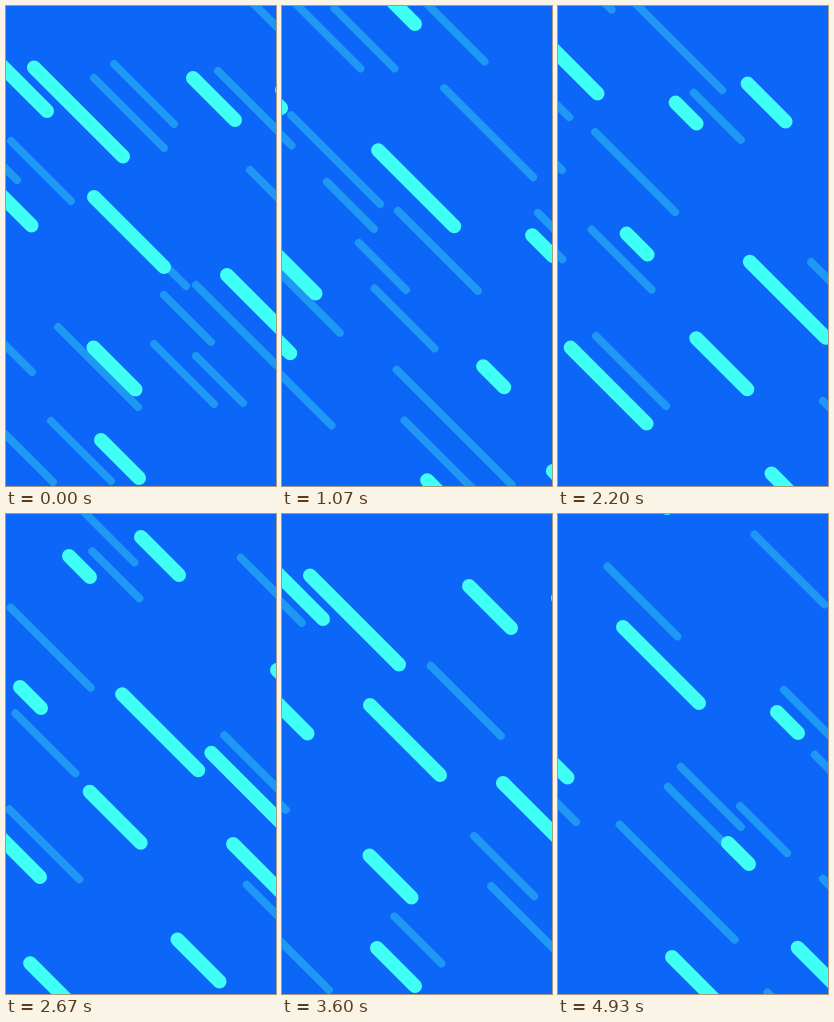
Recreate the animation shown at these times as an HTML page. Size 270 px wide and 480 px high, loop 4.99 s.

```html
<!DOCTYPE html>
<html lang="en">
<head>
<meta charset="utf-8">
<title>Diagonal streaks</title>
<style>
  html, body { margin: 0; width: 100%; height: 100%; overflow: hidden; background: #0c66f7; }
  svg { display: block; width: 100%; height: 100%; }
  line { stroke-linecap: round; }
  .thin { stroke: #1f97f5; stroke-width: 8; }
  .bold { stroke: #40fff5; stroke-width: 14; }
</style>
</head>
<body>
<svg viewBox="0 0 270 480"><g class="thin"></g><g class="bold"></g></svg>
<script>
const LOOP = 4990, FPS = 15, CYCLE = 3.6, MARGIN = 10;
const streaks = [];

const mod = (a, n) => ((a % n) + n) % n;

// One streak: heads up-left from (x0, y0) and re-enters after each cycle,
// wrapping at the point where its tail has left the stage.
function addStreak(kind, len, speed, cycle, x0, y0) {
  const el = document.createElementNS("http://www.w3.org/2000/svg", "line");
  el.setAttribute("x2", len);
  el.setAttribute("y2", len);
  document.querySelector("g." + kind).append(el);

  const diag = x0 - y0;
  const exit = Math.max(0, diag) - len - MARGIN;
  streaks.push(t => {
    const x = exit + mod(x0 - exit - speed * t, speed * cycle);
    el.setAttribute("transform", `translate(${x} ${x - diag})`);
  });
}

// A layer of equal streaks; "copy" repeats the whole group at an offset.
function addLayer(kind, len, speed, cycle, spots, copy) {
  for (const [dx, dy] of copy ? [[0, 0], copy] : [[0, 0]])
    for (const [x, y] of spots) addStreak(kind, len, speed, cycle, x + dx, y + dy);
}

const thin = (...layer) => addLayer("thin", ...layer);
const bold = (len, speed, ...spots) => addLayer("bold", len, speed, CYCLE, spots);

thin(60, 52, 2 * CYCLE, [[108, 58], [5, 135]], [40, 280]);
thin(47, 106, 2 * CYCLE, [[-21, 319], [158, 289], [494, 784], [238, -12]], [211, 31]);
thin(70, 74.5, 2 * CYCLE, [[-59, 104], [88, 72], [212, 65]], [476, 316]);
thin(70, 74.5, 2 * CYCLE, [[202, 494]]);
thin(80, 69.5, 2 * CYCLE, [[190, 279], [52, 321]]);
thin(89, 76.7, 2 * CYCLE, [[244, 164], [91, 191]]);
thin(115, 199, CYCLE, [[327, 576], [-68, 361], [49, -142]]);

bold(21, 117, [276, 84], [326, 485], [375, 354]);
bold(38, 117, [447, 335], [95, 434]);
bold(51, 117, [-25.5, 168.5], [-85, 340]);
bold(76, 117, [221, 269], [270, 599]);
bold(42, 90, [187, 72], [87.5, 341.5]);
bold(70, 149, [88, 191]);
bold(76, 162, [-35, 29]);
bold(89, 190, [28, 61.5]);

function draw() {
  // The motion advances in steps of 1/15 s, rounded to 10 ms.
  const step = Math.floor((performance.now() % LOOP + 3.4) * FPS / 1000);
  streaks.forEach(move => move(step / FPS));
  requestAnimationFrame(draw);
}
draw();
</script>
</body>
</html>
```
